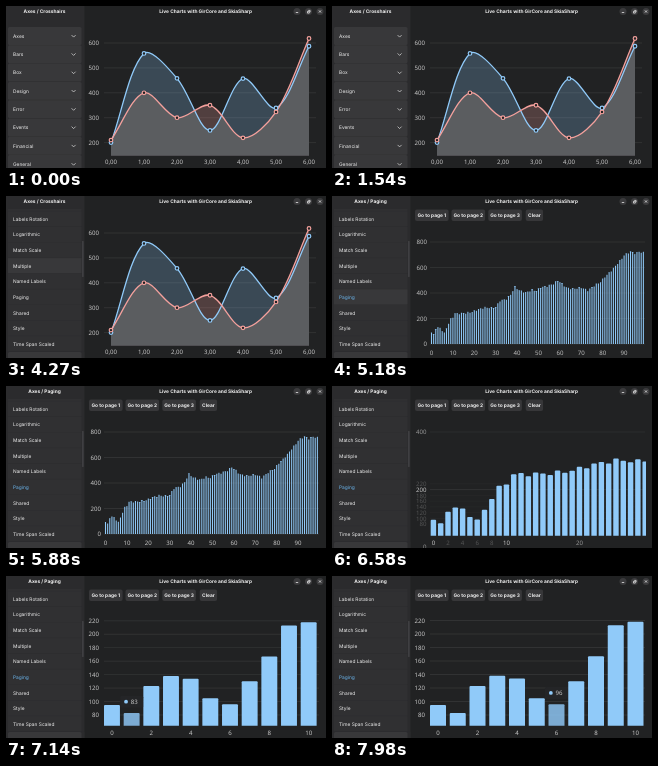
These frames come from a looping animation (320 by 162 pixels, 8 s). An HTML page:

```html
<!DOCTYPE html>
<html lang="en">
<head>
<meta charset="utf-8">
<title>Live Charts</title>
<style>
  html, body { margin: 0; width: 100%; height: 100%; overflow: hidden; background: #212223; }
  svg { display: block; width: 100vw; height: 100vh; }
  text { font: 4.85px Inter, "Open Sans", sans-serif; fill: #f2f2f2; text-rendering: geometricPrecision; }
  .bold { font-weight: 700; }
  .axis { font: 6.1px "Noto Sans", "Open Sans", sans-serif; fill: #c8c8c8; }
  .accent { fill: #6db9f2; }
  .grid { stroke: #414243; stroke-width: .5; }
  .icon { fill: none; stroke: #eee; stroke-width: .75; }
</style>
</head>
<body>
<svg viewBox="0 0 320 162">
  <defs>
    <clipPath id="listClip"><rect y="13" width="79" height="149"/></clipPath>
    <clipPath id="plotClip"><rect x="97" y="28" width="217" height="121.8"/></clipPath>
    <clipPath id="pageClip"><rect x="97" y="40" width="217" height="109.8"/></clipPath>
  </defs>
  <rect width="320" height="162" fill="#212223"/>
  <rect width="78.5" height="162" fill="#2b2b2d"/>
  <g id="list" clip-path="url(#listClip)"></g>
  <g id="title"></g>
  <g id="header"></g>
  <g id="lines"></g>
  <g id="paging">
    <g id="buttons"></g>
    <g id="grid"></g>
    <g id="bars" clip-path="url(#pageClip)"></g>
    <g id="labels"></g>
    <g id="tip"></g>
  </g>
</svg>
<script>
const LOOP = 8000;
const BLUE = '#90caf9', RED = '#f3a09c', OVERLAP = '#5b5d60';
const OPEN_AT = 1940, PAGE_AT = 4760, GROW_AT = 4840, ZOOM_AT = 6541, TIP_AT = 7000;

const $ = id => document.getElementById(id);
const clamp = v => Math.min(1, Math.max(0, v));
const mix = (a, b, p) => a + (b - a) * p;
const easeOut = v => 1 - (1 - clamp(v)) ** 3;
const expoOut = v => v <= 0 ? 0 : v >= 1 ? 1 : 1 - (2 ** (-10 * v) - 2 ** -10) / (1 - 2 ** -10);
const range = (from, to, step) =>
  Array.from({ length: Math.floor((to - from) / step) + 1 }, (_, i) => from + i * step);

// y is the middle of the capitals
function text(str, x, y, { cls = '', anchor = 'start', size = 4.85, opacity = 1 } = {}) {
  return `<text class="${cls}" x="${x}" y="${y + size * .36}" text-anchor="${anchor}" opacity="${opacity}">${str}</text>`;
}
const axisText = (str, x, y, anchor, opacity = 1) =>
  text(str, x, y, { cls: 'axis', anchor, size: 6.1, opacity });
const rect = (x, y, w, h, fill, extra = '') =>
  `<rect x="${x}" y="${y}" width="${w}" height="${h}" fill="${fill}" ${extra}/>`;
const gridLine = (y, x2, opacity = 1) =>
  `<line class="grid" x1="98" x2="${x2}" y1="${y}" y2="${y}" opacity="${opacity}"/>`;

// ---- header ----
$('header').innerHTML =
  text('Live Charts with GirCore and SkiaSharp', 199.7, 5.6, { cls: 'bold', anchor: 'middle' }) +
  [291, 302.5, 314].map(x => `<circle cx="${x}" cy="5.5" r="3.5" fill="#3b3b3d"/>`).join('') +
  `<path class="icon" d="M289.8 6.5h2.4M301.5 5.3h1.8v1.8h-1.8zM302.3 4.4h1.8v1.8M312.9 4.4l2.2 2.2M315.1 4.4l-2.2 2.2"/>`;

// ---- sidebar ----
const GROUPS = ['Axes', 'Bars', 'Box', 'Design', 'Error', 'Events', 'Financial', 'General'];
const AXES = ['Colors And Position', 'Crosshairs', 'Custom Separators Interval', 'Date Time Scaled',
  'Labels Format', 'Labels Format2', 'Labels Rotation', 'Logarithmic', 'Match Scale', 'Multiple',
  'Named Labels', 'Paging', 'Shared', 'Style', 'Time Span Scaled'];
const LIST_TOP = 21, GROUP_H = 18.3, ITEM_H = 15.62;
const WHEEL = [[3050, 200, 38], [3260, 200, 38], [3540, 200, 38], [3850, 80, 3.5]];

const scrollAt = t => WHEEL.reduce((sum, [at, dur, dist]) => sum + dist * easeOut((t - at) / dur), 0);

function hoveredAt(t) {
  if (t < 1900) return '';
  if (t < 3080) return 'Axes';
  if (t < 3900) return '';
  if (t < 4300) return 'Multiple';
  if (t < 4400) return 'Named Labels';
  return t < 5670 ? 'Paging' : '';
}

function groupRow(name, y, hover, open) {
  const d = open ? 1 : -1;
  return rect(2, y, 73.5, GROUP_H - .4, hover ? '#404042' : '#38383a', 'rx="1.5"') +
    text(name, 7, y + 9.1) +
    `<path class="icon" style="stroke:${open ? '#6db9f2' : '#d8d8d8'}" d="M65.6 ${y + 9.1 + d}l2 ${-2 * d}l2 ${2 * d}"/>`;
}

function drawList(t, selected) {
  const open = easeOut((t - OPEN_AT) / 280);
  const scroll = scrollAt(t), hover = hoveredAt(t);
  const top = LIST_TOP - scroll;
  const first = top + GROUP_H - .3;
  const end = first + AXES.length * ITEM_H * open;
  let out = groupRow('Axes', top, hover === 'Axes', open > 0);

  if (open > 0) AXES.forEach((name, i) => {
    const y = first + i * ITEM_H;
    if (y > end || y > 162 || y < -ITEM_H) return;
    out += rect(2, y, 73.5, ITEM_H - .4, hover === name ? '#38383a' : '#303032') +
      text(name, 7, y + 7.9, { cls: name === selected ? 'accent' : '' });
  });

  // Later groups cover the part of the list that is not yet revealed
  out += rect(0, end, 78.5, 170, '#2b2b2d');
  GROUPS.slice(1).forEach((name, i) => {
    const y = end + .3 + i * GROUP_H;
    if (y < 162) out += groupRow(name, y, false, false);
  });
  if (scroll > 0) out += rect(76.4, 15 + scroll * .255, 1, 36, '#4e4e50', 'rx=".5"');
  $('list').innerHTML = out;
  $('title').innerHTML = text('Axes / ' + selected, 38.5, 5.6, { cls: 'bold', anchor: 'middle' });
}

// ---- smooth lines ----
const SERIES = [
  [BLUE, [200, 558, 458, 249, 457, 339, 587]],
  [RED, [210, 400, 300, 350, 219, 323, 618]]
];
const lineX = i => 105 + i * 33;
const lineY = v => 37 + (600 - v) * .249;

function spline(pts, smooth = .65) {
  const at = i => pts[Math.min(pts.length - 1, Math.max(0, i))];
  const mid = (a, b) => a.map((v, k) => (v + b[k]) / 2);
  const dist = (a, b) => Math.hypot(b[0] - a[0], b[1] - a[1]);
  let d = `M${pts[0]}`;
  for (let i = 0; i < pts.length - 1; i++) {
    const [a, b, c, e] = [at(i - 1), at(i), at(i + 1), at(i + 2)];
    const [l1, l2, l3] = [dist(a, b), dist(b, c), dist(c, e)];
    const [m1, m2, m3] = [mid(a, b), mid(b, c), mid(c, e)];
    const c1 = b.map((v, k) => v + (m2[k] - mix(m1[k], m2[k], l1 / (l1 + l2))) * smooth);
    const c2 = c.map((v, k) => v + (m2[k] - mix(m2[k], m3[k], l2 / (l2 + l3))) * smooth);
    d += `C${c1} ${c2} ${c}`;
  }
  return d;
}

function buildLines() {
  let axes = '', areas = '', curves = '';
  range(200, 600, 100).forEach(v => {
    axes += gridLine(lineY(v), 310) + axisText(v, 93, lineY(v), 'end');
  });
  range(0, 6, 1).forEach(i => { axes += axisText(i + ',00', lineX(i), 156.3, 'middle'); });

  const shapes = SERIES.map(([color, values]) => {
    const pts = values.map((v, i) => [lineX(i), lineY(v)]);
    const line = spline(pts);
    return { color, pts, line, area: line + 'V149.8H105Z' };
  });
  shapes.forEach(({ color, line, area }) => {
    areas += `<path d="${area}" fill="${color}" fill-opacity=".23"/>`;
    curves += `<path d="${line}" fill="none" stroke="${color}" stroke-width="1.3"/>`;
  });
  const [blue, red] = shapes;
  areas += `<clipPath id="under"><path d="${blue.area}"/></clipPath>
    <path d="${red.area}" fill="${OVERLAP}" clip-path="url(#under)"/>`;
  const dots = shapes.map(({ color, pts }) => pts.map(([x, y]) =>
    `<circle cx="${x}" cy="${y}" r="1.8" fill="#212223" stroke="${color}" stroke-width="1.2"/>`).join('')).join('');
  $('lines').innerHTML = `${axes}<g clip-path="url(#plotClip)">${areas}</g>${curves}${dots}`;
}
buildLines();

// ---- paged bars ----
const START = [95, 83, 123, 138, 134, 105, 96, 130, 167, 213, 218];
const KNOTS = [[11, 252], [16, 256], [18, 262], [20, 273], [22, 288], [25, 302], [28, 298], [30, 306],
  [32, 358], [35, 373], [37, 408], [39, 472], [41, 443], [44, 426], [47, 447], [49, 440], [51, 468],
  [54, 479], [57, 498], [59, 525], [61, 498], [63, 466], [66, 456], [70, 466], [73, 443], [76, 482],
  [79, 514], [81, 556], [83, 588], [85, 625], [87, 668], [89, 708], [90, 733], [93, 765], [95, 748],
  [97, 763], [99, 755]];

function valueAt(i) {
  if (i < START.length) return START[i];
  const k = KNOTS.findIndex(([x]) => x >= i);
  const [x1, v1] = KNOTS[k];
  const [x0, v0] = KNOTS[k - 1] || [10, 218];
  return mix(v0, v1, (i - x0) / (x1 - x0)) + 7 * Math.sin(i * 2.3);
}
const VALUES = range(0, 99, 1).map(valueAt);
const WIDE = { x: range(0, 90, 10), y: range(0, 800, 200) };
const NEAR = { x: range(0, 10, 2), y: range(80, 220, 20) };

$('buttons').innerHTML = [['Go to page 1', 83, 33.6], ['Go to page 2', 119.5, 33.6],
  ['Go to page 3', 156.3, 33.6], ['Clear', 193.7, 17.4]].map(([label, x, w]) =>
  rect(x, 13.5, w, 11.6, '#373739', 'rx="2"') +
  text(label, x + w / 2, 19.4, { cls: 'bold', anchor: 'middle' })).join('');

// Ticks of both scales; shared ones stay, the others fade with the zoom
function ticks(axis, zoom, shown) {
  return [...new Set([...WIDE[axis], ...NEAR[axis]])].map(v => {
    const old = WIDE[axis].includes(v) ? 1 - zoom : 0;
    const fresh = NEAR[axis].includes(v) ? zoom : 0;
    return [v, (old + fresh) * shown];
  }).filter(([, opacity]) => opacity > .01);
}

// The hovered bar and the time since the pointer reached it
function hoveredBar(t) {
  const since = t - 7230, step = 155;
  if (since < 0) return [1, t - TIP_AT];
  const n = Math.min(4, Math.floor(since / step));
  return [2 + n, since - n * step];
}

function drawPaging(t) {
  const grow = expoOut((t - GROW_AT) / 800);
  const zoom = expoOut((t - ZOOM_AT) / 800);
  const x = i => mix(99.5 + 2.14 * i, 106 + 19.75 * i, zoom);
  const y = v => mix(148 - .1275 * v, 193 - .675 * v, zoom);
  const w = mix(1.05, 16, zoom);
  const [hot, since] = t >= TIP_AT ? hoveredBar(t) : [-1, 0];

  let grid = '', labels = '';
  ticks('y', zoom, grow).forEach(([v, opacity]) => {
    const py = y(v);
    if (py < 40) return;
    if (py < 150) grid += gridLine(py, 313, opacity);
    labels += axisText(v, mix(95, 93, zoom), py, 'end', opacity);
  });
  ticks('x', zoom, grow).forEach(([v, opacity]) => {
    if (x(v) < 312) labels += axisText(v, x(v), 156.4, 'middle', opacity);
  });

  let bars = '';
  VALUES.forEach((v, i) => {
    const left = x(i) - w / 2;
    if (left > 314) return;
    const top = y(v * grow);
    bars += rect(left, top, w, Math.max(0, y(0) - top), BLUE,
      `rx="${Math.min(1, w / 6)}" opacity="${i === hot ? .82 : 1}"`);
  });

  let tip = '';
  if (hot > 0) {
    const p = expoOut(since / 160);
    const from = Math.max(1, hot - 1);
    const cx = mix(x(from), x(hot), p);
    const cy = mix(y(VALUES[from]), y(VALUES[hot]), p) - 11.3;
    tip = `<g opacity="${hot === 1 ? p : 1}">` + rect(cx - 11.5, cy - 6, 23, 12, '#242527', 'rx="1.5"') +
      `<circle cx="${cx - 5.6}" cy="${cy}" r="1.9" fill="${BLUE}"/>` +
      axisText(VALUES[hot], cx - .9, cy, 'start') + '</g>';
  }
  $('grid').innerHTML = grid;
  $('bars').innerHTML = bars;
  $('labels').innerHTML = labels;
  $('tip').innerHTML = tip;
}

function draw(t) {
  const paged = t >= PAGE_AT;
  drawList(t, paged ? 'Paging' : 'Crosshairs');
  $('lines').style.display = paged ? 'none' : '';
  $('paging').style.display = paged ? '' : 'none';
  if (paged) drawPaging(t);
}

const begin = performance.now();
function tick() {
  draw((performance.now() - begin) % LOOP);
  requestAnimationFrame(tick);
}
tick();
</script>
</body>
</html>
```
